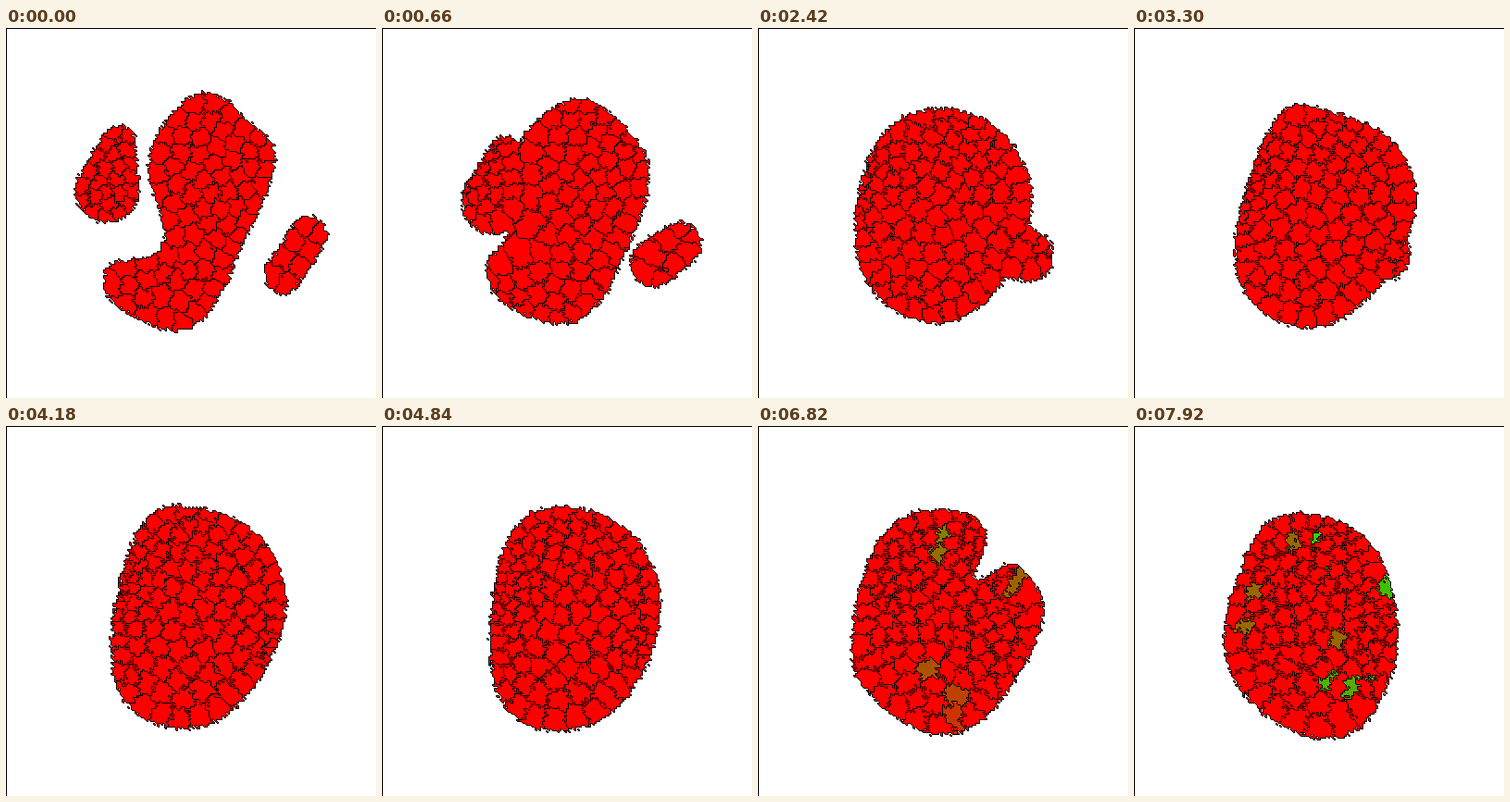
These frames come from a looping animation (400x400 px, 8000 ms). An HTML page with a canvas:

```html
<!DOCTYPE html>
<html>
<head>
<meta charset="utf-8">
<style>
html, body { margin: 0; width: 100%; height: 100%; overflow: hidden; background: #fff; }
canvas { display: block; }
</style>
</head>
<body>
<canvas id="stage" width="400" height="400"></canvas>
<script>
const GRID = 200, SIZE = 400, STEP = 220, LOOP = 8000, CELLS = 108;
const BLACK = 0xff000000, WHITE = 0xffffffff;
const MERGED = 1540, ROUND = 3300, TALL = 5720, NOTCHED = 6820, END = 7920;

const mix = (a, b, f) => a + (b - a) * f;
const mixAll = (a, b, f) => a.map((v, i) => mix(v, b[i], f));

// Points of a smooth closed curve through x, y pairs
function curve(pts) {
  const n = pts.length / 2, count = 90, out = [];
  for (let s = 0; s < count; s++) {
    const u = s * n / count, k = Math.floor(u), f = u - k;
    for (const axis of [0, 1]) {
      const [p, a, b, q] = [k - 1, k, k + 1, k + 2].map(i => pts[2 * ((i + n) % n) + axis]);
      const ease = f * f * (3 - 2 * f), g = 1 - f;
      out.push(mix(a, b, ease) + .6 * f * g * (g * (b - p) - f * (q - a)));
    }
  }
  return out;
}

const body = [
  [0, curve([210,71, 270,108, 291,145, 262,222, 205,322, 122,302, 112,258, 170,235, 156,140])],
  [MERGED, curve([205,86, 278,145, 275,250, 205,314, 115,265, 102,155])],
  [ROUND, curve([210,90, 293,140, 292,238, 200,324, 112,265, 148,108])],
  [TALL, curve([217,90, 288,148, 290,255, 228,328, 134,305, 128,138])],
  [NOTCHED, curve([205,91, 246,115, 236,166, 282,152, 306,220, 222,331, 122,292, 104,215, 138,115])],
  [END, curve([180,95, 265,140, 280,265, 210,339, 105,268, 122,140])]
];

// Side lumps: two end circles x, y, radius
const shift = (lump, dx, dy) => lump.map((v, i) => v + [dx, dy, 0][i % 3]);
const leftLump = [123,122,17, 109,180,35];
const left = [[0, leftLump], [MERGED, shift(leftLump, 26, 28)]];
const rightLump = [316,246,27, 285,238,32];
const right = [
  [0, [328,224,20, 299,270,20]],
  [MERGED, rightLump],
  [ROUND, shift(rightLump, -45, 0)]
];

// Cells turning green: where they are when notched and at the end
const turning = [
  [200,117, 193,121], [195,138, 217,155], [270,177, 265,181],
  [186,262, 210,272], [214,290, 235,280], [212,310, 258,270]
].map((p, i) => ({ from: p.slice(0, 2), to: p.slice(2), g0: .5 - .06 * i, g1: .8 - .03 * i }));
for (const p of [[170,125], [130,178], [120,214], [220,230]])
  turning.push({ from: p, to: p, g0: 0, g1: .4 });

let state = 7;
const random = () => (state = (state * 1664525 + 1013904223) >>> 0) / 2 ** 32;
const jitter = a => (random() * 2 - 1) * a;

function shapeAt(track, t) {
  const n = track.findIndex(key => key[0] >= t);
  if (n < 1) return n ? null : track[0][1];
  const [t0, a] = track[n - 1], [t1, b] = track[n];
  return mixAll(a, b, (t - t0) / (t1 - t0));
}

const mold = document.createElement('canvas');
mold.width = mold.height = GRID;
const pen = mold.getContext('2d', { willReadFrequently: true });
pen.scale(GRID / SIZE, GRID / SIZE);

function fillOutline(pts) {
  pen.beginPath();
  for (let i = 0; i < pts.length; i += 2) pen.lineTo(pts[i], pts[i + 1]);
  pen.fill();
}

function fillLump(lump) {
  for (let f = 0; f <= 1; f += .05) {
    const [x, y, r] = mixAll(lump.slice(0, 3), lump.slice(3), f);
    pen.beginPath();
    pen.arc(x, y, r, 0, 2 * Math.PI);
    pen.fill();
  }
}

function maskAt(t) {
  pen.clearRect(0, 0, SIZE, SIZE);
  fillOutline(shapeAt(body, t));
  for (const track of [left, right]) {
    const lump = shapeAt(track, t);
    if (lump) fillLump(lump);
  }
  const { data } = pen.getImageData(0, 0, GRID, GRID);
  return (x, y) => data[(y * GRID + x) * 4 + 3] > 127;
}

const cells = [];

// Each lattice site joins its nearest cell, with ragged borders
function assign(mask, rough, phase) {
  const owner = new Int16Array(GRID * GRID).fill(-1);
  for (let y = 2; y < GRID - 2; y++) for (let x = 2; x < GRID - 2; x++) {
    const dx = jitter(.9), dy = jitter(.9);
    if (!mask(Math.round(x + dx), Math.round(y + dy))) continue;
    const u = x + dx * rough + .7 * Math.sin(y * .9 + phase);
    const v = y + dy * rough + .7 * Math.sin(x * .9 + phase * 2);
    let best = Infinity, id = 0;
    for (let i = 0; i < CELLS; i++) {
      const c = cells[i], a = u - c.x, b = v - c.y;
      const d = a * a + b * b + c.green * 12;
      if (d < best) { best = d; id = i; }
    }
    owner[y * GRID + x] = id;
  }
  return owner;
}

// Move each cell to the middle of its sites
function relax(owner, wander) {
  const sums = cells.map(() => [0, 0, 0]);
  owner.forEach((id, k) => {
    if (id < 0) return;
    const s = sums[id];
    s[0] += k % GRID;
    s[1] += Math.floor(k / GRID);
    s[2]++;
  });
  cells.forEach((c, i) => {
    if (c.path) return;
    const [x, y, n] = sums[i];
    c.x = n ? x / n + jitter(wander) : mix(c.x, GRID / 2, .1);
    c.y = n ? y / n + jitter(wander) : mix(c.y, GRID / 2, .1);
  });
}

function turnGreen(t) {
  if (t < TALL) return;
  const early = (t - TALL) / (NOTCHED - TALL);
  const late = Math.max(0, (t - NOTCHED) / (END - NOTCHED));
  for (const path of turning) {
    const [x, y] = mixAll(path.from, path.to, late).map(v => v / 2);
    const far = c => Math.hypot(c.x - x, c.y - y);
    const cell = cells.find(c => c.path === path) ||
      cells.filter(c => !c.path).reduce((a, b) => far(a) < far(b) ? a : b);
    const pull = late ? 1 : .5;
    cell.path = path;
    cell.x = mix(cell.x, x, pull);
    cell.y = mix(cell.y, y, pull);
    cell.green = late ? mix(path.g0, path.g1, late) : path.g0 * early;
  }
}

function paint(owner) {
  const image = new ImageData(SIZE, SIZE);
  const px = new Uint32Array(image.data.buffer).fill(WHITE);
  const colors = cells.map(({ green }) =>
    (BLACK | Math.round(255 * green) << 8 | Math.round(255 * (1 - green))) >>> 0);
  for (let y = 0; y < GRID - 1; y++) for (let x = 0; x < GRID - 1; x++) {
    const k = y * GRID + x, p = 2 * y * SIZE + 2 * x, id = owner[k];
    const fill = id < 0 ? WHITE : colors[id];
    const edge = next => owner[next] === id ? fill : BLACK;
    px[p] = fill;
    px[p + 1] = edge(k + 1);
    px[p + SIZE] = edge(k + GRID);
    px[p + SIZE + 1] = edge(k + GRID + 1);
  }
  for (let i = 0; i < SIZE; i++) px[i] = px[i * SIZE] = BLACK;
  return image;
}

function settle() {
  const mask = maskAt(0);
  while (cells.length < CELLS) {
    const x = random() * GRID, y = random() * GRID;
    if (mask(Math.floor(x), Math.floor(y))) cells.push({ x, y, green: 0 });
  }
  for (let i = 0; i < 16; i++) relax(assign(mask, .5, 0), 0);
}

settle();
const images = [];
for (let t = 0; t < LOOP; t += STEP) {
  turnGreen(t);
  const owner = assign(maskAt(t), 1 + t / LOOP, t);
  images.push(paint(owner));
  relax(owner, .5);
}

const ctx = document.getElementById('stage').getContext('2d');
function draw() {
  ctx.putImageData(images[Math.floor(performance.now() % LOOP / STEP)], 0, 0);
  requestAnimationFrame(draw);
}
draw();
</script>
</body>
</html>
```
